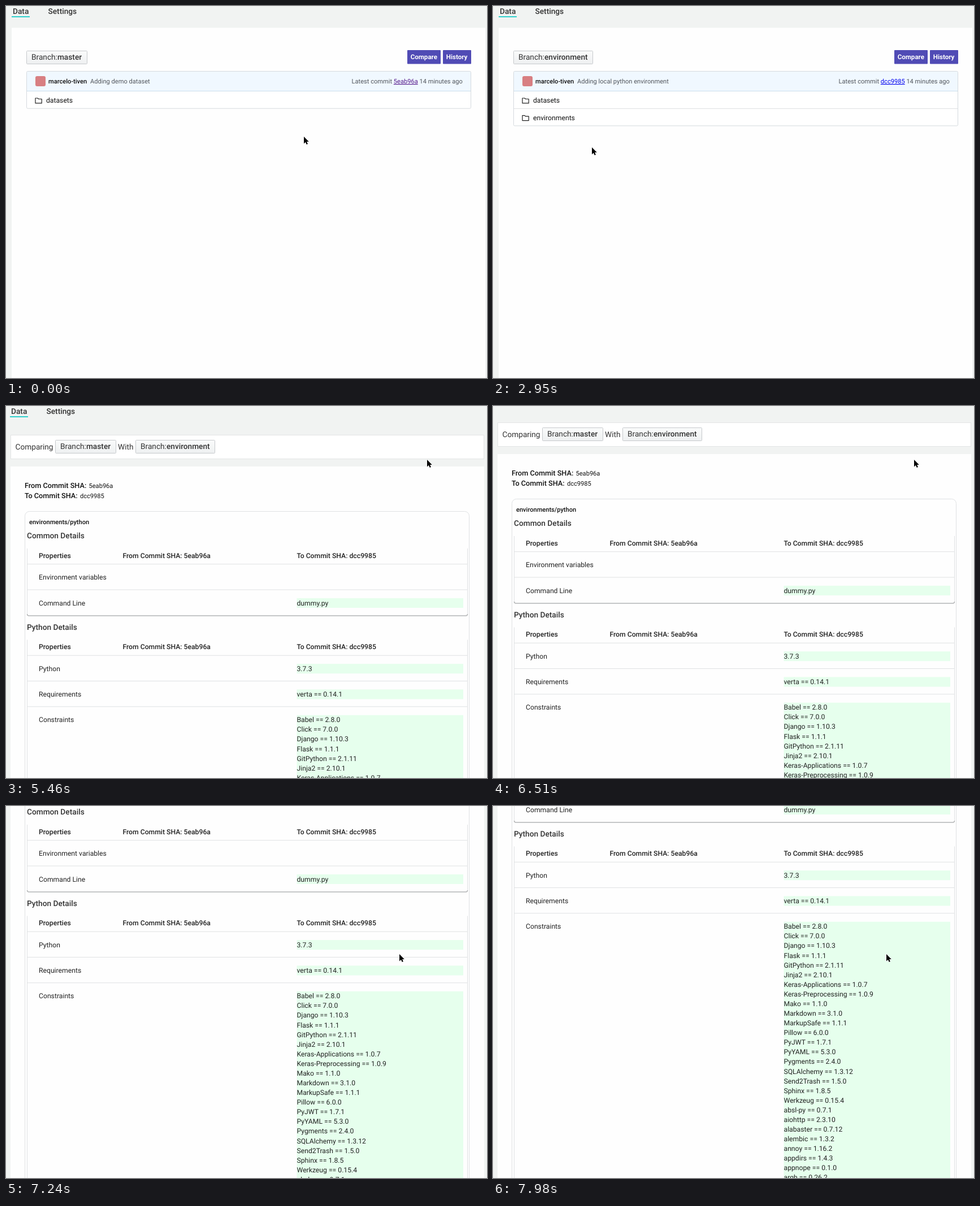
An HTML page that plays this animation: 851 by 658 pixels, repeating every 8 s.

```html
<!DOCTYPE html>
<html lang="en">
<head>
<meta charset="utf-8">
<title>Comparing branches</title>
<style>
  html, body { margin: 0; width: 100%; height: 100%; overflow: hidden; background: #f1f3f2; }
  svg { display: block; width: 851px; height: 658px; }
  text { font: 12.2px Roboto, sans-serif; fill: #222; text-rendering: geometricPrecision; white-space: pre; }
  .big { font-size: 13.7px; fill: #333; }
  .small { font-size: 11.1px; fill: #52565c; }
  .bold, .name { font-weight: 500; }
  .name { fill: #111; }
  .sha { font-size: 12.7px; font-weight: 500; fill: #111; }
  .action { font-size: 11.6px; font-weight: 700; fill: #fff; }
  .hint { fill: #a9abad; }
  .visited { fill: #551a8b; text-decoration: underline; }
  .link { fill: #00e; text-decoration: underline; }
  .line { fill: none; stroke: #dfe1e3; }
  .added { fill: #e6ffed; }
  .button { fill: url(#face); stroke: #c6c9cc; }
  .pressed { fill: #e4e6e9; stroke: #9b9ea1; }
  .menu { filter: drop-shadow(0 1px 2px #0003); }
  .raised { filter: drop-shadow(1px 2px 1.5px #0006); }

  .track { animation: 8s step-end infinite; }
  #tree { animation-name: tree; }
  #master { animation-name: master; }
  #environment { animation-name: environment; }
  #pressed { animation-name: pressed; }
  #menu { animation-name: menu; }
  #hover { animation-name: hover; }
  #compare { animation-name: compare; }
  #page { animation-name: scroll; }
  #cursor { animation-name: move; }
  #arrow { animation-name: arrow; }
  #hand { animation-name: hand; }

  @keyframes tree { 0% { opacity: 1 } 53.5%, 100% { opacity: 0 } }
  @keyframes master { 0% { opacity: 1 } 31.375%, 100% { opacity: 0 } }
  @keyframes environment { 0% { opacity: 0 } 33.25%, 100% { opacity: 1 } }
  @keyframes pressed { 0% { opacity: 0 } 11% { opacity: 1 } 31.375%, 100% { opacity: 0 } }
  @keyframes menu { 0% { opacity: 0 } 16.5% { opacity: 1 } 31.375%, 100% { opacity: 0 } }
  @keyframes hover { 0% { opacity: 0 } 49.75%, 100% { opacity: 1 } }
  @keyframes compare { 0% { opacity: 0 } 60.875%, 100% { opacity: 1 } }
  @keyframes hand { 0% { opacity: 0 } 11% { opacity: 1 } 31.375% { opacity: 0 } 49.75% { opacity: 1 } 53.5%, 100% { opacity: 0 } }
  @keyframes arrow { 0% { opacity: 1 } 11% { opacity: 0 } 31.375% { opacity: 1 } 49.75% { opacity: 0 } 53.5%, 100% { opacity: 1 } }

  @keyframes scroll {
    0% { transform: none }
    81.375% { transform: translateY(-22px) }
    83.25% { transform: translateY(-95px) }
    85% { transform: translateY(-160px) }
    86.875% { transform: translateY(-200px) }
    88.75% { transform: translateY(-214px) }
    90.5% { transform: translateY(-219px) }
    94.25% { transform: translateY(-236px) }
    96.125% { transform: translateY(-285px) }
    98% { transform: translateY(-325px) }
    99.75%, 100% { transform: translateY(-342px) }
  }
  @keyframes move {
    0% { transform: translate(527px, 231px) }
    3.625% { transform: translate(518px, 227px) }
    5.5% { transform: translate(440px, 195px) }
    7.25% { transform: translate(315px, 150px) }
    9.125% { transform: translate(200px, 115px) }
    11% { transform: translate(132px, 97px) }
    12.75% { transform: translate(110px, 91px) }
    20.25% { transform: translate(114px, 108px) }
    22.125% { transform: translate(130px, 185px) }
    24% { transform: translate(147px, 241px) }
    25.75% { transform: translate(140px, 258px) }
    27.625% { transform: translate(134px, 267px) }
    33.25% { transform: translate(150px, 262px) }
    35.125% { transform: translate(175px, 250px) }
    37% { transform: translate(200px, 240px) }
    38.75% { transform: translate(215px, 233px) }
    42.375% { transform: translate(245px, 224px) }
    44.25% { transform: translate(390px, 185px) }
    46.125% { transform: translate(570px, 138px) }
    48% { transform: translate(690px, 108px) }
    49.75% { transform: translate(738px, 97px) }
    51.625% { transform: translate(745px, 95px) }
    88.75% { transform: translate(715px, 215px) }
    90.5%, 100% { transform: translate(696px, 262px) }
  }
</style>
</head>
<body>
<svg id="stage" viewBox="0 0 851 658"></svg>
<script>
const packages = `Babel 2.8.0,Click 7.0.0,Django 1.10.3,Flask 1.1.1,GitPython 2.1.11,Jinja2 2.10.1,
Keras-Applications 1.0.7,Keras-Preprocessing 1.0.9,Mako 1.1.0,Markdown 3.1.0,MarkupSafe 1.1.1,
Pillow 6.0.0,PyJWT 1.7.1,PyYAML 5.3.0,Pygments 2.4.0,SQLAlchemy 1.3.12,Send2Trash 1.5.0,
Sphinx 1.8.5,Werkzeug 0.15.4,absl-py 0.7.1,aiohttp 2.3.10,alabaster 0.7.12,alembic 1.3.2,
annoy 1.16.2,appdirs 1.4.3,appnope 0.1.0,argh 0.26.2`
  .split(',').map(item => item.trim().replace(' ', ' == '));

const text = (x, y, content, style = '') => `<text x="${x}" y="${y}" class="${style}">${content}</text>`;
const rect = (x, y, w, h, attrs = '') => `<rect x="${x}" y="${y}" width="${w}" height="${h}" ${attrs}/>`;
const rule = (x1, x2, y) => `<path class="line" d="M${x1} ${y}H${x2}"/>`;
const track = (id, content) => `<g id="${id}" class="track">${content}</g>`;

const branchButton = (x, y, w, name, style = 'button') =>
  rect(x + .5, y + .5, w - 1, 23, `rx="1" class="${style}"`) +
  text(x + 9, y + 16, `Branch:<tspan class="bold">${name}</tspan>`, 'big');

const tabs = dx =>
  text(12 + dx, 14, 'Data', 'big bold') + text(74.5 + dx, 14, 'Settings', 'big bold') +
  rect(10 + dx, 18, 32, 2, 'fill="#30d0cc"');

const action = (x, w, label, fill = '#504bb5', attrs = '') =>
  rect(x, 78, w, 24.5, `rx="1" fill="${fill}" ${attrs}`) + text(x + 5.7, 94, label, 'action');

const folder = (y, name) =>
  `<path d="M52 ${y - 4}h4l1.4 1.5h5.8v7.4H52z" fill="none" stroke="#222" stroke-width="1.2" stroke-linejoin="round"/>` +
  text(71, y + 4.3, name, 'name" style="font-weight:400');

function listing({ branch, width, message, commit, linkStyle, folders }) {
  const height = 35 + folders.length * 30.7;
  return branchButton(36, 79, width, branch) + action(710, 59, 'Compare') + action(773, 50, 'History') +
    rect(36.5, 115.5, 786, height, 'rx="2" fill="#fff"') + rect(37, 116, 785, 34.5, 'fill="#f0f8ff"') +
    `<path d="M37 150.5H822" stroke="#cbdfec"/>` +
    folders.map((name, i) => (i ? rule(37, 822, 181.5) : '') + folder(167 + i * 30.7, name)).join('') +
    rect(36.5, 115.5, 786, height, 'rx="2" fill="none" stroke="#d5dade"') +
    rect(52, 124, 18, 18, 'rx="3" fill="#d87f82"') +
    text(75, 137, 'marcelo-tiven', 'small bold name') + text(149, 137, message, 'small') +
    text(611.5, 137, `Latest commit <tspan class="${linkStyle}">${commit}</tspan> 14 minutes ago`, 'small');
}

const menu = () =>
  rect(36.5, 107.5, 256, 178.5, 'rx="1" fill="#fff" stroke="#c9cccf" class="menu"') +
  rect(37, 108, 255, 117.5, 'fill="#f6f7f9"') + rule(37, 292, 150.5) +
  text(50, 133.3, 'Switch branches/tags', 'big') +
  rect(44, 158.5, 240.5, 37, 'rx="4" fill="#fff" stroke="#b9bcbf"') + text(55, 181, 'Find...', 'big hint') +
  rect(44, 203, 85, 23, 'fill="#fff"') + rect(129, 203, 60, 22.5, 'fill="#e2e4e7"') +
  text(58, 219, 'Branches', 'big bold') + text(144.5, 219, 'Tags', 'big') +
  rule(37, 292, 225.5) + rule(37, 292, 255.5) +
  '<path d="M50.5 241l2.8 2.8 5.4-5.6" fill="none" stroke="#111" stroke-width="1.8"/>' +
  text(66, 245.3, 'master', 'big bold') + text(66, 275.3, 'environment', 'big');

const added = (y, lines) =>
  rect(514.5, y - 12.6, 294.5, lines.length * 17.1, 'class="added"') +
  lines.map((line, i) => text(514.5, y + i * 17.08, line)).join('');

function details(y, title, rows, bottom) {
  return text(37, y, title, 'big bold') +
    `<path class="line" d="M37.5 ${y + 18}V${bottom}M816.5 ${y + 18}V${bottom}"/>` +
    text(58, y + 34.6, 'Properties', 'bold') + text(206.5, y + 34.6, 'From Commit SHA: 5eab96a', 'bold') +
    text(514.5, y + 34.6, 'To Commit SHA: dcc9985', 'bold') +
    rows.map(([label, lines], i) =>
      rule(38, 816, y + 45.7 + i * 45.3) + (lines ? added(y + 118.5 + (i - 1) * 45.3, lines) : '') +
      text(58, y + 73.2 + i * 45.3, label)).join('');
}

const comparison = () =>
  tabs(-3) + rect(8.5, 51.5, 837, 42, 'fill="#fff" stroke="#e3e5e5"') +
  text(16.5, 77, 'Comparing', 'big') + branchButton(87, 60, 108, 'master') +
  text(198, 77, 'With', 'big') + branchButton(229, 60, 141, 'environment') +
  rect(8, 107, 838, 1000, 'fill="#fefefe"') +
  text(33, 144.7, 'From Commit SHA:', 'sha') + text(146.5, 144.7, '5eab96a', 'small name" style="font-weight:400') +
  text(33, 162.7, 'To Commit SHA:', 'sha') + text(131, 162.7, 'dcc9985', 'small name" style="font-weight:400') +
  rect(33.5, 186.5, 786, 1000, 'rx="8" class="line"') +
  text(41, 209.3, 'environments/python', 'small bold name') +
  details(234, 'Common Details', [['Environment variables'], ['Command Line', ['dummy.py']]], 369) +
  '<path d="M37.5 368q0 3 3 3H813.5q3 0 3-3" fill="none" stroke="#b3b5b6" stroke-width="1.5"/>' +
  details(395.5, 'Python Details',
    [['Python', ['3.7.3']], ['Requirements', ['verta == 0.14.1']], ['Constraints', packages]], 1100);

const cursor =
  track('arrow', '<path d="M0 0V12.4L2.9 9.8 4.8 14 6.9 13.1 5.1 9H8.8Z" fill="#000" stroke="#fff" stroke-width="1.1" paint-order="stroke"/>') +
  track('hand', `<path d="M-1.6 1.2Q-.6-.8 .9 .8L2.6 4.6Q4 3.6 5 4.9 6.6 4.2 7.2 5.6 8.8 5.4 9 7.4
    L8.8 10.6 7.8 14.4H1.6L-2.6 9.8Q-4.2 7.6-2.4 7.4L.2 8.4Z" fill="#fff" stroke="#111" stroke-width="1.2" stroke-linejoin="round"/>
    <path d="M3.2 9v3M5 9v3M6.7 9v3" stroke="#111" stroke-width=".8"/>`);

document.getElementById('stage').innerHTML =
  `<defs><linearGradient id="face" x2="0" y2="1"><stop stop-color="#fafbfb"/><stop offset="1" stop-color="#eef0f1"/></linearGradient></defs>` +
  track('tree',
    tabs(0) + rect(10, 38.5, 838, 620, 'fill="#fefefe"') +
    track('master', listing({
      branch: 'master', width: 108, message: 'Adding demo dataset',
      commit: '5eab96a', linkStyle: 'visited', folders: ['datasets'] })) +
    track('environment', listing({
      branch: 'environment', width: 141, message: 'Adding local python environment',
      commit: 'dcc9985', linkStyle: 'link', folders: ['datasets', 'environments'] })) +
    track('pressed', branchButton(36, 79, 108, 'master', 'pressed')) +
    track('hover', action(710, 59, 'Compare', '#38347f', 'class="raised"')) +
    track('menu', menu())) +
  track('compare', track('page', comparison())) +
  track('cursor', cursor);
</script>
</body>
</html>
```
